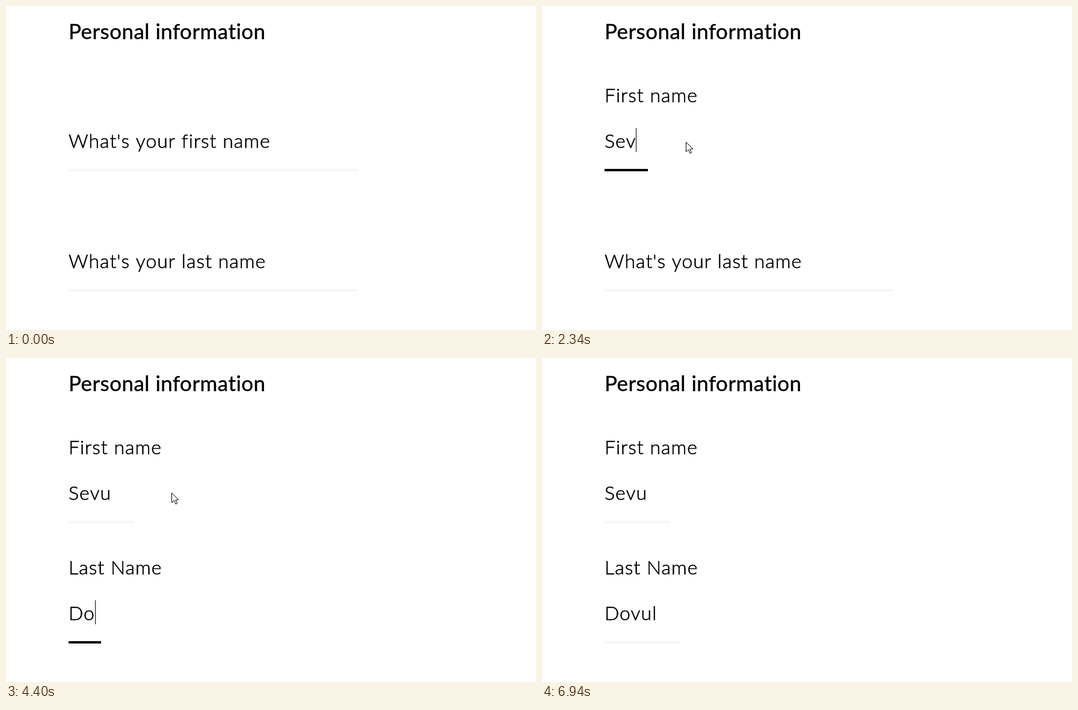
An HTML page with a canvas that plays this animation: 881x539 px, repeating every 7.88 s.

```html
<!DOCTYPE html>
<html lang="en">
<head>
<meta charset="utf-8">
<title>Personal information form</title>
<style>
html, body { margin: 0; width: 100%; height: 100%; overflow: hidden; background: #fff; }
canvas { display: block; }
</style>
</head>
<body>
<canvas id="stage" width="881" height="539"></canvas>
<script>
const ctx = document.getElementById('stage').getContext('2d');
const LOOP = 7880, LEFT = 104, FULL_WIDTH = 480, CHAR_WIDTH = 18, GREY = 247;
const TITLE = { font: '400 35px Lato, sans-serif', spacing: '0.45px', weight: 0.4 };
const BODY = { font: '300 32px Lato, sans-serif', spacing: '1px', weight: 0.6 };

// Times in ms; keys holds one keystroke time per letter of value.
const fields = [
  { y: 136, placeholder: "What's your first name", label: 'First name', value: 'Sevu',
    focus: 1470, blur: 3130, keys: [1850, 2200, 2340, 2430], lineStart: 2025 },
  { y: 336, placeholder: "What's your last name", label: 'Last Name', value: 'Dovul',
    focus: 3130, blur: 6100, keys: [4080, 4400, 4490, 4560, 5110], lineStart: 4100 },
];

// Pointer hotspot: [time, x, y]
const pointerPath = [
  [240, 713, 497], [1020, 227, 232], [2040, 227, 232], [2330, 239, 226],
  [2780, 239, 226], [2960, 275, 224], [5750, 275, 224], [5870, 467, 184],
  [5990, 467, 184], [6070, 551, 161], [6520, 551, 161], [6940, 777, 539],
];
const clicks = [[1390, 1470], [6100, 6180]];

const clamp = v => Math.min(1, Math.max(0, v));
const mix = (a, b, p) => a + (b - a) * p;
const ease = v => { const p = clamp(v); return p * p * (3 - 2 * p); };

function useStyle(style) {
  ctx.font = style.font;
  ctx.letterSpacing = style.spacing;
  ctx.lineWidth = style.weight;
  ctx.fillStyle = ctx.strokeStyle = '#000';
}

// The thin outline thickens the letters slightly.
function drawText(text, y, alpha = 1) {
  ctx.globalAlpha = alpha;
  ctx.fillText(text, LEFT, y);
  ctx.strokeText(text, LEFT, y);
  ctx.globalAlpha = 1;
}

function lineWidth(field, t) {
  return field.keys.reduce((width, key, i) => {
    const start = i ? key : field.lineStart;
    return mix(width, (i + 3) * CHAR_WIDTH, ease((t - start) / 130));
  }, FULL_WIDTH);
}

function drawField(field, t) {
  const focused = t >= field.focus && t < field.blur;
  const fade = t < field.focus ? 0 : clamp((t - field.focus + 30) / 260);
  const typed = field.keys.filter(key => t >= key);
  const text = field.value.slice(0, typed.length);

  useStyle(BODY);
  drawText(field.label, field.y + 24, clamp(fade * 2 - 1));
  if (text) drawText(text, field.y + 100);
  else drawText(field.placeholder, field.y + 100, 1 - fade);

  const lastInput = typed.length ? typed[typed.length - 1] : field.focus;
  if (focused && (t - lastInput) % 1060 < 530) {
    ctx.fillRect(LEFT + Math.round(ctx.measureText(text).width), field.y + 67, 1, 40);
  }

  const shade = focused ? mix(GREY, 0, ease((t - field.lineStart) / 130)) : GREY;
  ctx.fillStyle = `rgb(${shade},${shade},${shade})`;
  ctx.fillRect(LEFT, field.y + 135, lineWidth(field, t), 4);
}

function pointerAt(t) {
  const next = pointerPath.findIndex(point => point[0] > t);
  if (next < 1) return null;
  const [t0, x0, y0] = pointerPath[next - 1], [t1, x1, y1] = pointerPath[next];
  const p = ease((t - t0) / (t1 - t0));
  return [Math.round(mix(x0, x1, p)), Math.round(mix(y0, y1, p))];
}

function drawArrow(x, y) {
  const outline = [[0, 0], [0, 16], [4, 12.5], [6.5, 18.5], [9, 17.5], [6.5, 11.5], [11.3, 11.3]];
  ctx.beginPath();
  for (const [dx, dy] of outline) ctx.lineTo(x + 0.5 + dx, y + 0.5 + dy);
  ctx.closePath();
  ctx.fillStyle = '#fff';
  ctx.fill();
  ctx.strokeStyle = '#000';
  ctx.lineWidth = 1;
  ctx.stroke();
}

function drawBeam(x, y) {
  ctx.fillStyle = '#333';
  ctx.fillRect(x, y - 7, 1, 14);
  for (const edge of [y - 8, y + 7]) {
    ctx.fillRect(x - 3, edge, 3, 1);
    ctx.fillRect(x + 1, edge, 3, 1);
  }
}

function drawPointer(t) {
  const pos = pointerAt(t);
  if (!pos) return;
  const [x, y] = pos;
  const overInput = fields.some(field => y >= field.y + 64 && y <= field.y + 139
    && x >= LEFT && x <= LEFT + lineWidth(field, t));
  if (clicks.some(([start, end]) => t >= start && t < end)) {
    ctx.fillStyle = 'rgba(255,255,0,.55)';
    ctx.beginPath();
    ctx.arc(overInput ? x - 2 : x, overInput ? y - 1 : y, 12, 0, Math.PI * 2);
    ctx.fill();
  }
  (overInput ? drawBeam : drawArrow)(x, y);
}

function render(now) {
  const t = now % LOOP;
  ctx.fillStyle = '#fff';
  ctx.fillRect(0, 0, 881, 539);
  useStyle(TITLE);
  drawText('Personal information', 55);
  fields.forEach(field => drawField(field, t));
  drawPointer(t);
}

const startTime = performance.now();
function tick() {
  render(performance.now() - startTime);
  requestAnimationFrame(tick);
}
tick();
</script>
</body>
</html>
```
